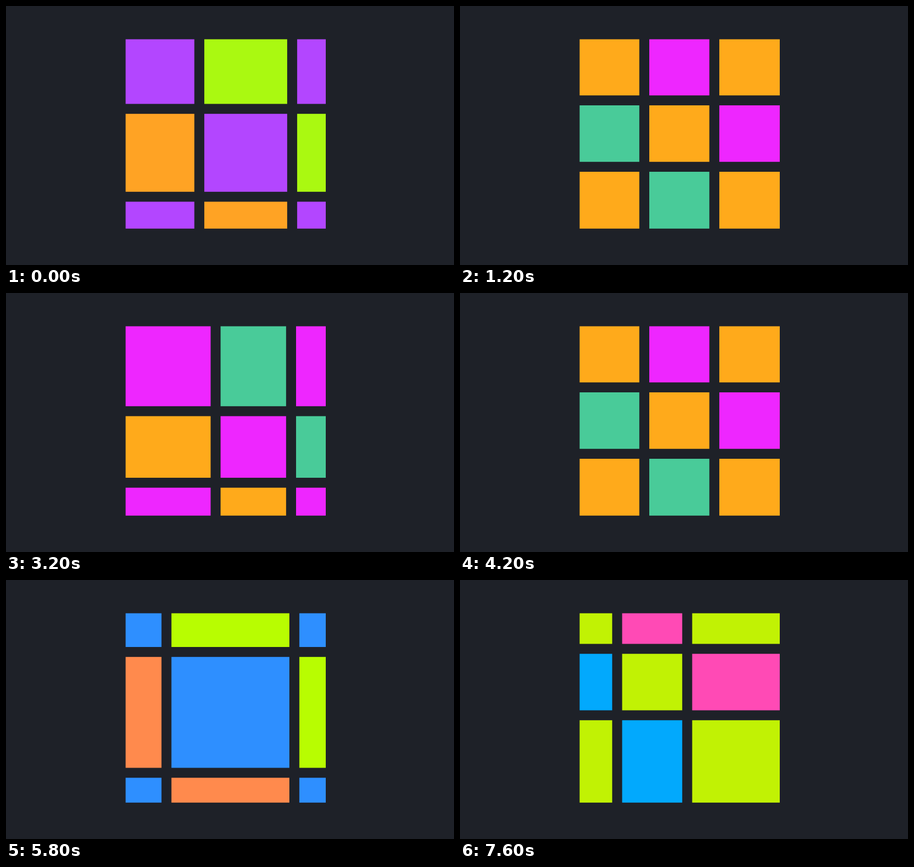
Animation, 800 px wide and 464 px high, one loop 7.7 s. Source, as an HTML page with a canvas:

```html
<!DOCTYPE html>
<html lang="en">
<head>
<meta charset="utf-8">
<title>Shifting colour grid</title>
<style>
  html, body { margin: 0; width: 100%; height: 100%; overflow: hidden; background: #1e2128; }
  canvas { display: block; }
</style>
</head>
<body>
<canvas width="800" height="464"></canvas>
<script>
const ctx = document.querySelector('canvas').getContext('2d');

const LOOP = 7700, STEP = 100, CYCLE = 3000, START = 1810;
const BOX = { x: 213.6, y: 59.6, w: 357.4, h: 339.2, gap: 17.8 };

// Keyframes at each quarter of the cycle, eased one by one
const TRACKS = [[1, 1, 1], [1, 2, 3], [1, 5, 1], [3, 2, 1]];
const COLORS = [[255, 169, 27], [182, 255, 0], [0, 168, 255], [255, 28, 255]];

const bezier = (a, b, u) => 3 * a * u * (1 - u) ** 2 + 3 * b * u * u * (1 - u) + u ** 3;

// CSS "ease": cubic-bezier(.25, .1, .25, 1)
function ease(x) {
  let lo = 0, hi = 1;
  for (let i = 0; i < 24; i++) {
    const mid = (lo + hi) / 2;
    if (bezier(0.25, 0.25, mid) < x) lo = mid; else hi = mid;
  }
  return bezier(0.1, 1, lo);
}

function sample(frames, time) {
  const pos = (time % CYCLE) / CYCLE * frames.length;
  const i = Math.floor(pos), k = ease(pos - i);
  const next = frames[(i + 1) % frames.length];
  return frames[i].map((v, j) => v + (next[j] - v) * k);
}

// Start and size of each track along one axis
function layout(start, length, tracks) {
  const unit = (length - 2 * BOX.gap) / tracks.reduce((a, b) => a + b);
  return tracks.map(fr => {
    const cell = [start, fr * unit];
    start += cell[1] + BOX.gap;
    return cell;
  });
}

function draw() {
  const now = performance.now() % LOOP;
  const time = START + Math.floor((now + 2) / STEP) * STEP % LOOP;
  const tracks = sample(TRACKS, time);
  const cols = layout(BOX.x, BOX.w, tracks);
  const rows = layout(BOX.y, BOX.h, tracks);

  // Three cell groups share one colour cycle, a second apart
  const fills = [0, 2000, 1000].map(shift => `rgb(${sample(COLORS, time + shift).map(Math.round)})`);

  ctx.fillStyle = '#1e2128';
  ctx.fillRect(0, 0, 800, 464);
  rows.forEach(([y, h], r) => cols.forEach(([x, w], c) => {
    const group = (r + c) % 2 === 0 ? 0 : c > r ? 1 : 2;
    ctx.fillStyle = fills[group];
    ctx.fillRect(x, y, w, h);
  }));
  requestAnimationFrame(draw);
}
draw();
</script>
</body>
</html>
```
